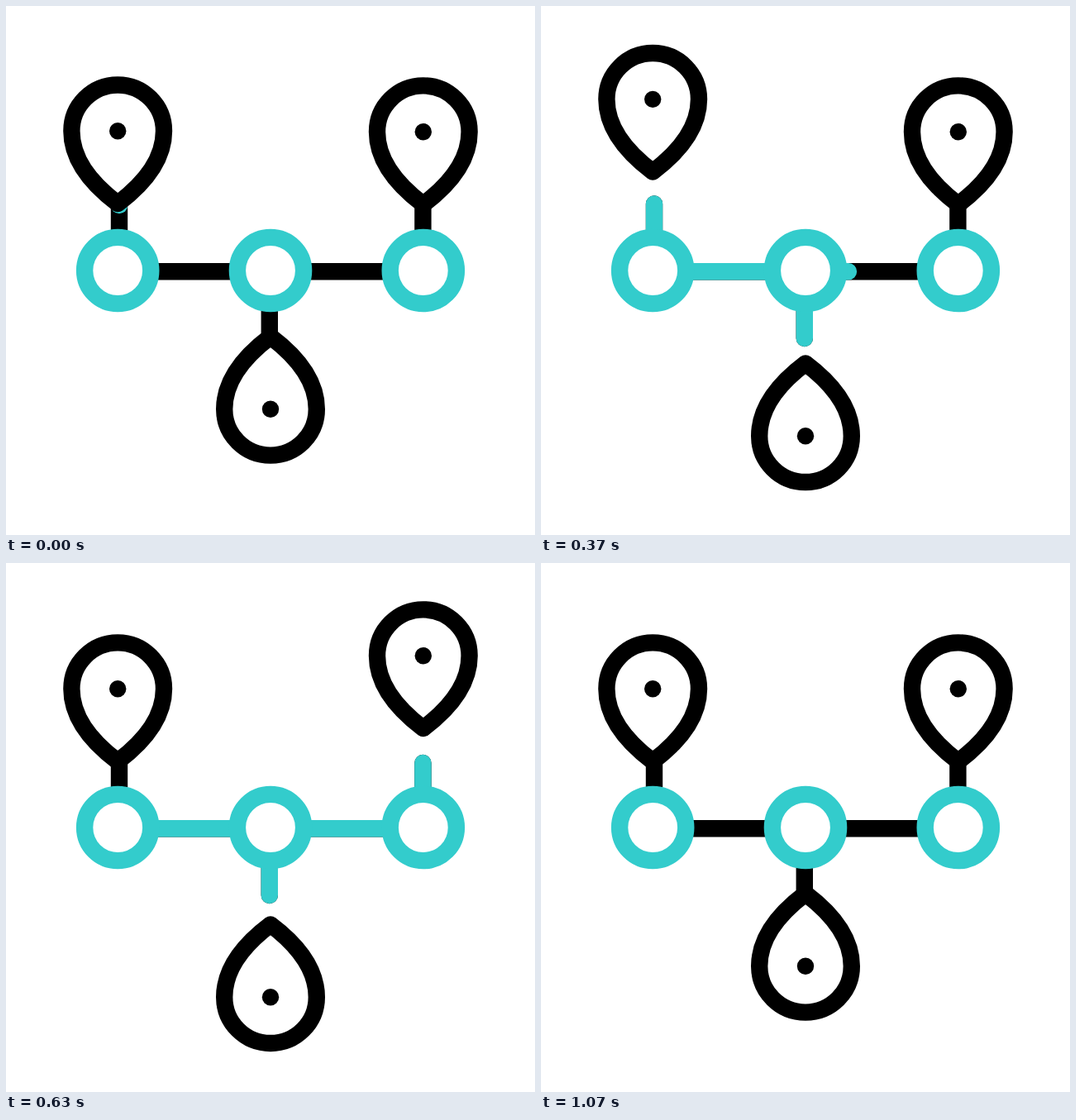
These frames come from a looping animation (640 px wide and 640 px high, 1.67 s). An HTML page:

```html
<!DOCTYPE html>
<html lang="en">
<head>
<meta charset="utf-8">
<title>Route pins</title>
<style>
  html, body { margin: 0; height: 100%; overflow: hidden; background: #fff; }
  svg { display: block; width: 100%; height: 100%; }
  .line { fill: none; stroke: #000; stroke-width: 20.4; stroke-linecap: round; stroke-linejoin: round; }
  .teal { stroke: #33cccc; }
  .stop { fill: #fff; }
</style>
</head>
<body>
<svg viewBox="0 0 640 640">
  <defs>
    <g id="pin">
      <path class="line" d="M0 87.8C-17 75 -55.8 43 -55.8 0A55.8 55.8 0 0 1 55.8 0C55.8 43 17 75 0 87.8Z"/>
      <circle r="10.2"/>
    </g>
  </defs>
  <path class="line" d="M137 239.5V321.2H504.4V242M318.8 321.2V402"/>
  <path class="line teal" id="flow" d="M137 239.5V321.2H318.8V402V321.2H504.4V242"/>
  <circle class="line teal stop" cx="135.2" cy="320" r="40.1"/>
  <circle class="line teal stop" cx="320" cy="320" r="40.1"/>
  <circle class="line teal stop" cx="504.8" cy="320" r="40.1"/>
  <use class="pin" href="#pin"/>
  <use class="pin" href="#pin"/>
  <use class="pin" href="#pin"/>
</svg>
<script>
const LOOP = 1670, LAST = 32, STEPS_PER_MS = 0.03;

// Times are in animation steps; lift is the travel away from the line.
const pins = [
  { x: 135.2, y: 152.2, dir: 1, lift: 67, up: [-0.48, 6.37], down: [7.34, 15.63] },
  { x: 320, y: 487.8, dir: -1, lift: 63, up: [7.18, 14.67], down: [15.3, 23.76] },
  { x: 504.8, y: 152.2, dir: 1, lift: 66.3, up: [14.9, 22.1], down: [23.1, 31.5] }
];
const headSpan = [-0.5, 17.7], tailSpan = [14.8, 30.7];

const flow = document.getElementById("flow");
const pinNodes = document.querySelectorAll(".pin");
const length = flow.getTotalLength();

function ease(step, [start, end]) {
  const u = Math.min(1, Math.max(0, (step - start) / (end - start)));
  return u * u * (3 - 2 * u);
}

function draw(now) {
  const step = Math.min(LAST, Math.floor((now % LOOP + 3.4) * STEPS_PER_MS));

  pins.forEach(({ x, y, dir, lift, up, down }, i) => {
    const shift = lift * (ease(step, up) - ease(step, down));
    pinNodes[i].setAttribute("transform", `translate(${x} ${y - dir * shift}) scale(1 ${dir})`);
  });

  // The coloured stretch lies between the tail and the head of the flow.
  const head = length * ease(step, headSpan);
  const tail = length * ease(step, tailSpan);
  flow.style.visibility = head > tail ? "visible" : "hidden";
  flow.style.strokeDasharray = `${head - tail} ${2 * length}`;
  flow.style.strokeDashoffset = -tail;
}

const began = performance.now();
function tick() {
  draw(performance.now() - began);
  requestAnimationFrame(tick);
}
tick();
</script>
</body>
</html>
```
